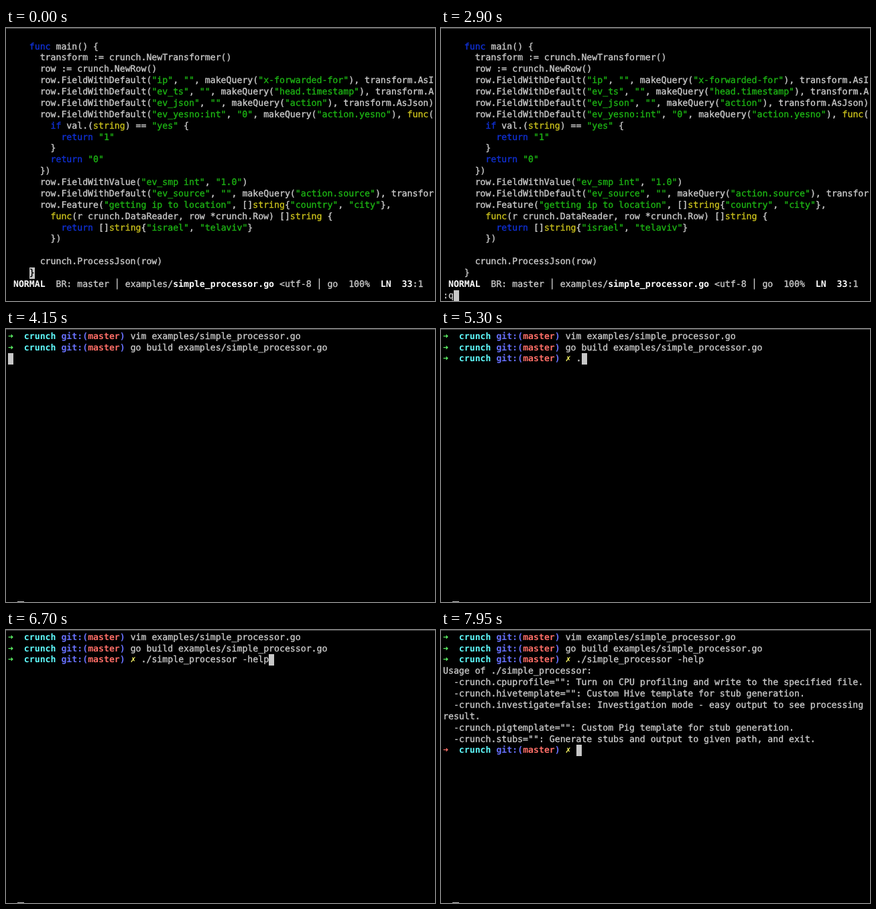
An HTML page for the animation above (8 s loop, 640 by 407 pixels).

```html
<!DOCTYPE html>
<html lang="en">
<head>
<meta charset="utf-8">
<title>Terminal session</title>
<style>
  html, body { margin: 0; width: 100%; height: 100%; overflow: hidden; background: #000; }
  #stage {
    position: relative; width: 640px; height: 407px; overflow: hidden;
    background: #000; color: #cacaca;
    font: 13.2px/17px "DejaVu Sans Mono", "Liberation Mono", monospace;
    text-rendering: geometricPrecision; font-variant-ligatures: none;
    -webkit-text-stroke: .35px;
  }
  #stage::before { content: ""; position: absolute; left: 0; top: 0; width: 100%; height: 1px; background: #4a4a4a; }
  .row { position: absolute; left: 3px; height: 17px; white-space: pre; }
  .cursor { position: absolute; width: 8px; height: 17px; background: #c7c7c7; }
  .residue { position: absolute; left: 17px; top: 406px; width: 10px; height: 1px; background: #c7c7c7; }
  .cell { display: inline-block; width: 1ch; height: 17px; vertical-align: top; }
  b { color: #fff; -webkit-text-stroke: 0; }
  .str { color: #1db414; }
  .type { color: #c9c01c; }
  .key { color: #1030d4; }
  .under { color: #000; }
  .ok { color: #5ffa68; }
  .fail { color: #ff6e67; }
  .dir { color: #60fdff; }
  .git { color: #6871ff; }
  .branch { color: #ff6e67; }
  .dirty { color: #fffc67; }
</style>
</head>
<body>
<div id="stage"></div>
<script>
const LOOP = 8000, CHAR = 7.947, LINE = 16.87, LEFT = 3, TOP = 2.75;
const stage = document.getElementById("stage");

const code = `    func main() {
      transform := crunch.NewTransformer()
      row := crunch.NewRow()
      row.FieldWithDefault("ip", "", makeQuery("x-forwarded-for"), transform.AsI
      row.FieldWithDefault("ev_ts", "", makeQuery("head.timestamp"), transform.A
      row.FieldWithDefault("ev_json", "", makeQuery("action"), transform.AsJson)
      row.FieldWithDefault("ev_yesno:int", "0", makeQuery("action.yesno"), func(
        if val.(string) == "yes" {
          return "1"
        }
        return "0"
      })
      row.FieldWithValue("ev_smp int", "1.0")
      row.FieldWithDefault("ev_source", "", makeQuery("action.source"), transfor
      row.Feature("getting ip to location", []string{"country", "city"},
        func(r crunch.DataReader, row *crunch.Row) []string {
          return []string{"israel", "telaviv"}
        })

      crunch.ProcessJson(row)`.split("\n");

const statusBar = " <b>NORMAL</b>  BR: master │ examples/<b>simple_processor.go</b>" +
  " &lt;utf-8 │ go  100%  <b>LN</b>  <b>33</b>:1";

const usage = `Usage of ./simple_processor:
  -crunch.cpuprofile="": Turn on CPU profiling and write to the specified file.
  -crunch.hivetemplate="": Custom Hive template for stub generation.
  -crunch.investigate=false: Investigation mode - easy output to see processing
result.
  -crunch.pigtemplate="": Custom Pig template for stub generation.
  -crunch.stubs="": Generate stubs and output to given path, and exit.`.split("\n");

// Each entry holds from its time until the next one.
const exCommand = [[0, ""], [2700, ":"], [2850, ":q"]];
const build = [[2950, ""], [3450, "go build "], [3650, "go build examples/simple_processor.go"]];
const run = [
  [4300, ""], [5300, "."], [5400, "./"], [5550, "./s"], [5650, "./si"],
  [5750, "./simple_processor "], [6150, "./simple_processor -"],
  [6250, "./simple_processor -h"], [6300, "./simple_processor -he"],
  [6400, "./simple_processor -hel"], [6500, "./simple_processor -help"]
];
const QUIT = 2950, BUILD = 4150, BUILT = 4300, RUN = 6950, DONE = 7000;

const textAt = (steps, t) => steps.filter(([at]) => at <= t).pop()[1];

const rowTop = n => Math.round(TOP + LINE * n);

const row = (n, html) => `<div class="row" style="top:${rowTop(n)}px">${html}</div>`;

const cursor = (n, col) =>
  `<div class="cursor" style="left:${Math.round(LEFT + CHAR * col)}px;top:${rowTop(n)}px"></div>`;

const highlight = line => line.replace(
  /("[^"]*")|\b(func(?= main)|if|return)\b|\b(func|string)\b/g,
  (word, str, key) => `<span class="${str ? "str" : key ? "key" : "type"}">${word}</span>`);

const codeRows = code.map((line, i) => row(i + 1, highlight(line))).join("");

function prompt(dirty, failed) {
  return `<b class="cell ${failed ? "fail" : "ok"}">➜</b>  <b class="dir">crunch</b> ` +
    `<b class="git">git:(<b class="branch">master</b>)</b> ` +
    (dirty ? `<b class="cell dirty">✗</b> ` : "");
}

function editor(t) {
  const typed = textAt(exCommand, t);
  const brace = typed ? "}" : `<span class="under">}</span>`;
  return codeRows +
    (typed ? cursor(23, typed.length) : cursor(21, 4)) +
    row(21, "    " + brace) + row(22, statusBar) + row(23, typed);
}

function shell(t) {
  let html = `<div class="residue"></div>` +
    row(0, prompt() + "vim examples/simple_processor.go");
  const first = textAt(build, t);
  html += row(1, prompt() + first);
  if (t < BUILD) return html + cursor(1, 23 + first.length);
  if (t < BUILT) return html + cursor(2, 0);

  const second = textAt(run, t);
  html += row(2, prompt(true) + second);
  if (t < RUN) return html + cursor(2, 25 + second.length);
  if (t < DONE) return html + cursor(3, 0);

  return html + usage.map((line, i) => row(i + 3, line)).join("") +
    row(10, prompt(true, true)) + cursor(10, 25);
}

let shown = "";
function draw() {
  const t = performance.now() % LOOP;
  const html = t < QUIT ? editor(t) : shell(t);
  if (html !== shown) stage.innerHTML = shown = html;
  requestAnimationFrame(draw);
}
draw();
</script>
</body>
</html>
```
